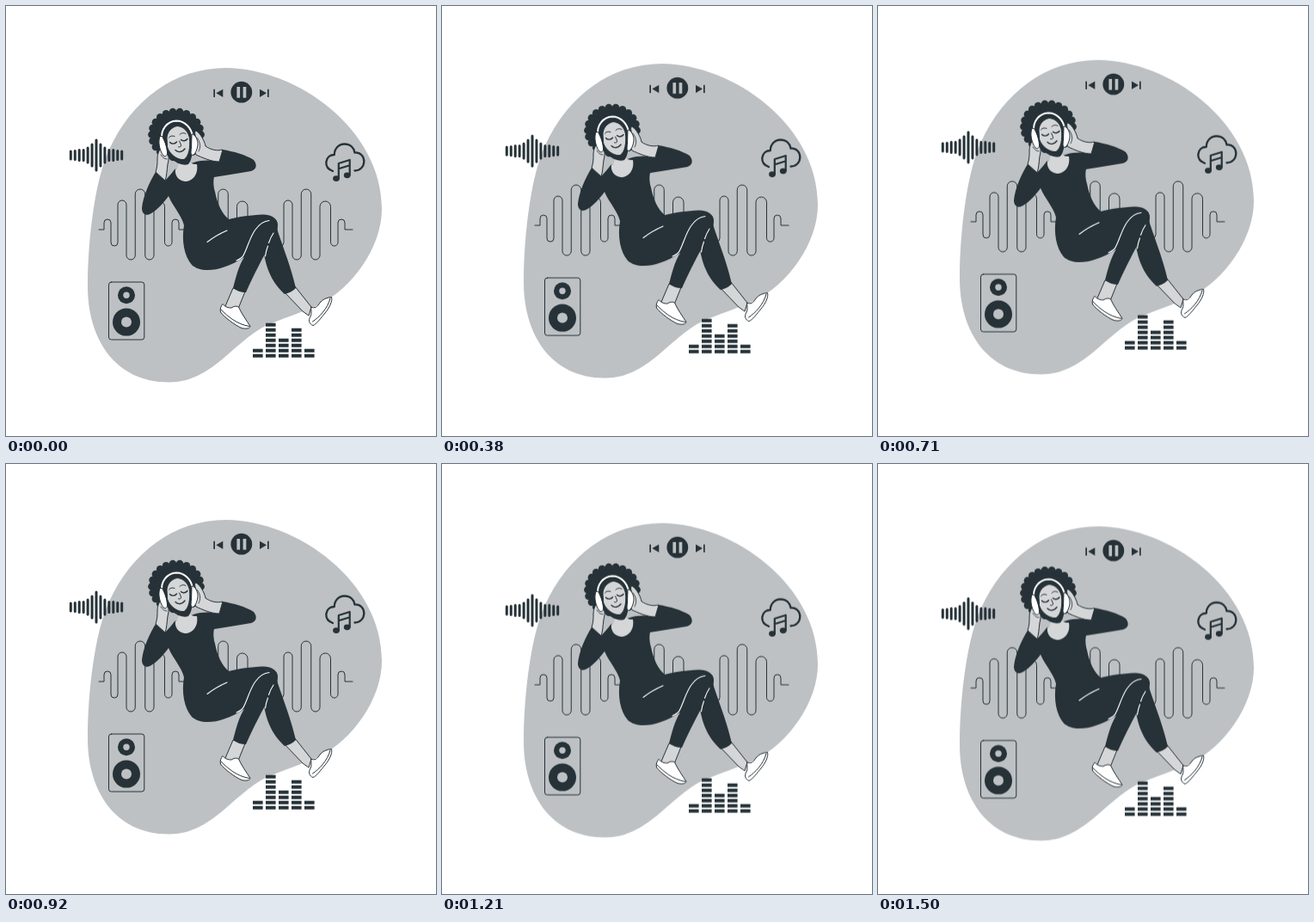
Write an HTML page that moves like this. It is 500 px wide and 500 px high and loops after 1540 ms.

```html
<!DOCTYPE html>
<html lang="en">
<head>
<meta charset="utf-8">
<title>Listening to music</title>
<style>
  html, body { margin: 0; height: 100%; overflow: hidden; background: #fff; }
  svg { display: block; width: 100vw; height: 100vh; }
  .ink { fill: #263238; }
  .bg { fill: #bdc1c4; }
  .line { fill: none; stroke: #263238; stroke-linecap: round; stroke-linejoin: round; }
  .skin, .white { stroke: #263238; stroke-width: 1; stroke-linejoin: round; }
  .skin { fill: #d4d6d7; }
  .white { fill: #fff; }
  .shine { fill: none; stroke: #fff; stroke-width: 1.1; stroke-linecap: round; }
</style>
</head>
<body>
<svg viewBox="0 0 500 500">
  <g id="scene">
    <path class="bg" d="M256 72C340 73 437 144 437 236C437 281 402 328 365 347C342 357 322 363 302 372C264 391 239 437.500 190 437.500C125 437.500 95 385 95 326C95 270 104 200 120 167C146 110 195 72 256 72Z"/>

    <path id="wave" class="line" stroke-width="1"/>
    <path id="bars" class="line" stroke-width="3"/>
    <g id="levels" class="ink"></g>

    <g id="player">
      <circle class="ink" cx="273.800" cy="100.200" r="12.400"/>
      <path class="bg" d="M268.400 94h3.700v12.800h-3.700zM275.600 94h3.700v12.800h-3.700z"/>
      <path class="ink" d="M241.300 96.700h1.700v9.200h-1.700zM252.300 96.700v9.200l-8-4.600zM295 96.700v9.200l8-4.600zM304 96.700h1.700v9.200h-1.700z"/>
    </g>

    <g id="cloud">
      <path class="line" stroke-width="2.300" d="M380 192C374.500 190 372 186 372.300 181.500C373 176 377 173 381.800 173C381.800 165.500 387 160.500 393.500 160.500C400 160.500 404.500 164.500 405.500 170.500C412 170 416.500 175 416.300 181C416.100 187 411.500 191.500 405.500 191.500"/>
      <path class="line" stroke-width="2.200" d="M386.800 200.500V183L399.700 179V196.500M386.800 189.300L399.700 185.300"/>
      <ellipse class="ink" cx="384" cy="200.600" rx="3.900" ry="3.400"/>
      <ellipse class="ink" cx="396.700" cy="196.800" rx="3.900" ry="3.400"/>
    </g>

    <g id="speaker">
      <rect class="line" x="119.500" y="321" width="41.300" height="67" rx="3"/>
      <circle class="ink" cx="140" cy="336.300" r="10"/>
      <circle class="bg" cx="140" cy="336.300" r="3.700"/>
      <circle class="ink" cx="140" cy="367.600" r="16"/>
      <circle class="bg" cx="140" cy="367.600" r="6"/>
    </g>

    <g id="legs">
      <path class="skin" d="M323 332L336 326L355 350L352 360L345 355Z"/>
      <path class="white" d="M357 371.500C353 370 351 366 354 361C355.500 358 355 354 354.500 350C359 352 362 350 365 345C368 341 373 339 378.500 338.500C380 343 376 351 371 357C366 363 361 370 357 371.500Z"/>
      <path class="line" d="M356.500 367C364 362 374 352 377 340"/>
      <path class="ink" d="M313 252C318 270 331 301 337 328C333 332 328 334 324 335C314 326 303 311 300 287Z"/>
      <path class="skin" d="M264 328L278 332L270 352L263 356L255 349Z"/>
      <path class="white" d="M252 346.500C255 350 258 351 262 351C265 349 268 348.500 270.500 350C274 358 280 366 284 372.500C283 375.500 278 375.500 274 374.500C266 371 254 362 249.500 356C248.500 352 250 349 252 346.500Z"/>
      <path class="line" d="M250 353C258 361 268 370 283 372.500"/>
    </g>

    <g id="body">
      <path class="ink" d="M174 193C167 204 159 222 158 235C158 242 163 245 169 241C176 237 184 228 189 221C194 233 204 243 207 255C204 272 207 291 216 301C227 311 251 309 277 292C270 303 267 317 264 328C268 331 273 333 279 333C288 312 300 291 306 278C311 269 316 262 316 254C315 245 306 242 298 242.500C286 243 270 245 259 248C251 241 246 231 243 216C241 209 241 203 242 199C257 197 271 194 285 192C292 190 292 184 288 179C279 173 264 169 252 167L248 181C238 179 228 179 218 182L196 190C193 194 189 199 185 203Z"/>
      <path class="skin" style="stroke:none" d="M200 179L213 177C213 183 216 184 222 184C224 196 217 204 208 204C199 203 196 195 197 190C201 188 201 184 200 179Z"/>
      <path class="shine" d="M234 274.500C241 269 249 264.500 257 261M268 296C273 294 276 291 277 288C281 280 284 268 290 260C295 253 300 250 306 249.500M301.500 291C302 287 303 283 304.500 279M305.500 275.500C307 271 309 267 311 264"/>
    </g>

    <g id="head">
      <g id="hair" class="ink"><ellipse cx="198" cy="150" rx="29" ry="27"/></g>
      <path class="ink" d="M183 160L215 155C218 166 217 178 212 184C204 187 188 180 183 160Z"/>
      <path class="skin" d="M187 154C187 147 192 141 199 139.500C207 140 212.500 147 213.500 154C214.500 163 213 175 207 178.500C199 179.500 190 172 187.500 164Z"/>
      <path class="line" stroke-width="4" d="M181.500 156C179 143 188 134 198 133.500C208 133.500 216 142 217 152"/>
      <path class="shine" style="stroke-width:2" d="M181.500 156C179 143 188 134 198 133.500C208 133.500 216 142 217 152"/>
      <path class="line" stroke-width="1.400" d="M190.500 158.500C193 161 196.500 160.500 198.500 158M203.500 155.500C205.500 157.500 209 157 211 154.500M197 167.500C200.500 171 205 170 208 166"/>
      <path class="line" d="M189.500 153C191 151 193.500 150.500 196 151.500M202 149.500C204 147.500 206.500 147 209 148.500M201.500 157C203 160 204 162 203.300 163.200C202.500 164 201.500 164 200.500 163.800"/>
    </g>

    <g id="arms">
      <path class="skin" d="M174 193C176 187 176 183 176 178C176 172 178 167 181 165C185 164 187 168 188 172C190 176 189 180 188 184C187 191 187 198 185 203Z"/>
      <path class="white" d="M179 151.500C176.500 158 178.500 168 183 174C185.500 176 188 174 187.500 170C187 163 184 155 181.500 151.500Z"/>
      <path class="line" stroke-width=".8" d="M180 173C182 176 184 178 187 178M182.500 153C186 160 188.500 167 187.500 173"/>
      <path class="skin" d="M252 167C245 169 238 167 232 163C231 157 226 148 221 145C218.500 146 220 150 221 154C218 160 218 168 221 173C228 176 238 181 248 181Z"/>
      <path class="white" d="M216 149C220 149 223.500 156 223 162C222 168 219.500 173 217 173.500C214.500 173 215 169 215.500 165Z"/>
      <path class="line" stroke-width=".8" d="M222 153C226 158 227 164 224 169"/>
    </g>
  </g>
</svg>
<script>
  const $ = id => document.getElementById(id);

  function add(parent, tag, attrs) {
    const el = document.createElementNS('http://www.w3.org/2000/svg', tag);
    for (const key in attrs) el.setAttribute(key, attrs[key]);
    parent.append(el);
  }

  // Thin meander: the same group of rounded humps, three times
  const mid = 260;
  const edges = [-42, -34, -26, -16, -5.75, 5.75, 16, 28.5, 37, 45];
  const peaks = [248, 279, 226, 295, 213, 295, 227, 279, 248];
  let wave = `M108 ${mid}`;
  for (const cx of [156, 252.5, 349]) {
    wave += `H${cx + edges[0]}`;
    peaks.forEach((peak, i) => {
      const r = (edges[i + 1] - edges[i]) / 2;
      const up = peak < mid;
      wave += `V${up ? peak + r : peak - r}a${r} ${r} 0 0 ${up ? 1 : 0} ${2 * r} 0`;
    });
    wave += `V${mid}`;
  }
  $('wave').setAttribute('d', wave + 'H403');

  // Symmetric sound bars
  const reach = [17.5, 12.5, 8.5, 6, 6, 5, 4.5];
  let bars = '';
  for (let i = -6; i <= 6; i++) {
    const h = reach[Math.abs(i)];
    bars += `M${105 + i * 4.95} ${173.5 - h}v${2 * h}`;
  }
  $('bars').setAttribute('d', bars);

  // Equalizer columns
  [2, 7, 4, 6, 2].forEach((count, col) => {
    for (let row = 0; row < count; row++) {
      add($('levels'), 'rect', { x: 287 + col * 15, y: 404.7 - row * 6, width: 11.6, height: 4 });
    }
  });

  // Curls around the head
  for (let i = 0; i < 22; i++) {
    const a = i / 22 * 2 * Math.PI;
    add($('hair'), 'circle', { cx: 198 + 28.5 * Math.cos(a), cy: 149.5 + 26.5 * Math.sin(a), r: 4.4 });
  }

  // Linear float of 10 px up and back, held at 24 steps per second
  const loop = 1540, steps = 37;
  const float = Array.from({ length: steps + 1 }, (_, i) => {
    const p = (i + 1) / steps % 1;
    const y = 0.5 - 10 * (1 - Math.abs(1 - 2 * p));
    return {
      offset: i < steps ? Math.round(i * 100 / 24) * 10 / loop : 1,
      transform: `translateY(${y}px)`,
      easing: 'step-end'
    };
  });
  $('scene').animate(float, { duration: loop, iterations: Infinity });
</script>
</body>
</html>
```
